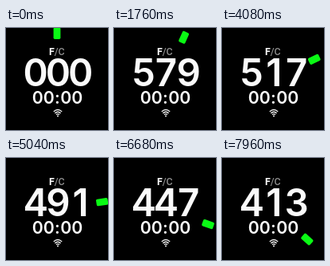
These frames come from a looping animation (128x128 px, 8000 ms). An HTML page:

```html
<!DOCTYPE html>
<html lang="en">
<head>
<meta charset="utf-8">
<title>Dial countdown</title>
<style>
  html, body { margin: 0; width: 100%; height: 100%; overflow: hidden; background: #000; }
  svg { display: block; width: 100vw; height: 100vh; }
  text { font-family: Inter, Roboto, sans-serif; text-anchor: middle; fill: #fafafa; }
  .value { font-size: 47.5px; font-weight: 600; }
  .clock { font-size: 21.3px; font-weight: 600; }
  .unit { font: 700 12.4px Roboto, sans-serif; }
  .dim { fill: #8c8c8c; font-weight: 500; }
  .wifi { fill: none; stroke: #f0f0f0; stroke-width: 1.3; }
</style>
</head>
<body>
<svg viewBox="0 0 128 128">
  <rect width="128" height="128" fill="#000"/>
  <rect id="hand" x="59.6" y="-0.6" width="8.8" height="14.6" rx="1.8" fill="#0afa14"/>
  <text class="unit" x="63.8" y="34">F<tspan class="dim">/C</tspan></text>
  <g id="value"></g>
  <g id="clock"></g>
  <g class="wifi">
    <path d="M59.8 105Q65 100 70.2 105"/>
    <path d="M61.4 107Q65 103.4 68.6 107"/>
    <path d="M63 108.9Q65 106.8 67 108.9"/>
    <circle cx="65" cy="110.4" r="1" fill="#f0f0f0" stroke="none"/>
  </g>
</svg>
<script>
const LOOP = 8000, STEP = 40, START = 80;
const SPIN = 17.3;    // degrees per second
const RAMP = 0.544;   // seconds until the hand reaches full speed
const hand = document.getElementById('hand');

// One text element per character keeps the columns fixed.
function makeRow(id, centers, y) {
  const group = document.getElementById(id);
  return centers.map(x => {
    const cell = document.createElementNS('http://www.w3.org/2000/svg', 'text');
    cell.setAttribute('class', id);
    cell.setAttribute('x', x);
    cell.setAttribute('y', y);
    return group.appendChild(cell);
  });
}

function setRow(row, string) {
  row.forEach((cell, i) => {
    if (cell.textContent !== string[i]) cell.textContent = string[i];
  });
}

const value = makeRow('value', [37.2, 65.4, 93.6], 72.6);
setRow(makeRow('clock', [39.7, 53.7, 64.4, 75.2, 89.2], 95.4), '00:00');

function angleAt(s) {
  return s < RAMP ? SPIN * s * s / (2 * RAMP) : SPIN * (s - RAMP / 2);
}

function draw(ms) {
  const t = Math.floor(ms / STEP) * STEP;
  const running = t >= START;
  const count = running ? Math.round(626.15 - 0.02677 * t) : 0;
  const angle = running ? angleAt((t - START) / 1000) : 0;
  setRow(value, String(count).padStart(3, '0'));
  hand.setAttribute('transform', `rotate(${angle} 64 64)`);
}

const origin = performance.now();
function tick() {
  draw((performance.now() - origin) % LOOP);
  requestAnimationFrame(tick);
}
tick();
</script>
</body>
</html>
```
